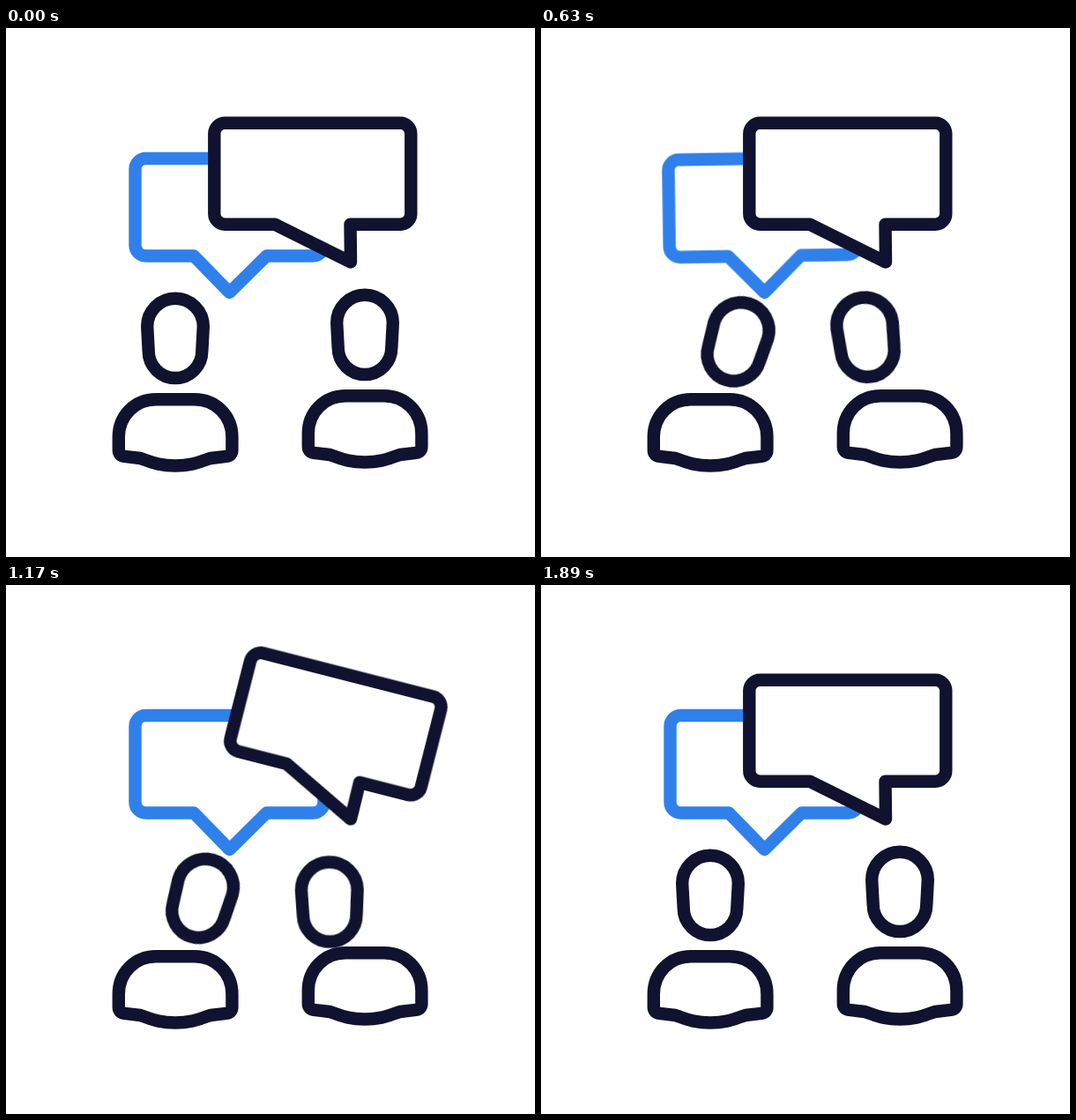
Write an HTML page that moves like this. It is 600x600 px and loops after 1920 ms.

```html
<!DOCTYPE html>
<html lang="en">
<head>
<meta charset="utf-8">
<title>Conversation</title>
<style>
  html, body { margin: 0; width: 100%; height: 100%; overflow: hidden; background: #fff; }
  svg { display: block; width: 100vw; height: 100vh; }

  .ink, .blue { fill: none; stroke-width: 14.4; stroke-linejoin: round; stroke-linecap: round; }
  .ink { stroke: #11122f; }
  .blue { stroke: #3080ec; }
  .front { fill: #fff; }

  .move {
    animation-duration: 1920ms;
    animation-iteration-count: infinite;
    animation-timing-function: cubic-bezier(.37, 0, .63, 1);
  }
  .bubble { animation-name: wobble; }
  .blue { transform-origin: 253.5px 300px; }
  .front { transform-origin: 391px 265.5px; animation-delay: 832ms; }
  .head { transform-origin: 192px 352px; }
  .body { transform-origin: 192px 503.5px; }
  .left.head { animation-name: lean-left; }
  .right.head { animation-name: lean-right; }
  .left.body { animation-name: squash-left; }
  .right.body { animation-name: squash-right; }

  /* swings about the tail tip, dying out after 880 ms */
  @keyframes wobble {
    0% { transform: rotate(0deg); }
    9.17% { transform: rotate(-21.5deg); }
    18.33% { transform: rotate(14.8deg); }
    27.5% { transform: rotate(-9.6deg); }
    36.67% { transform: rotate(4.2deg); }
    45.83%, 100% { transform: rotate(0deg); }
  }

  @keyframes lean-left {
    0% { transform: translate(0, 0) rotate(0deg); }
    14.06% { transform: translate(28px, 1px) rotate(12.8deg); }
    23.44% { transform: translate(32.5px, 5.5px) rotate(18.5deg); }
    42.19% { transform: translate(29.5px, 2.5px) rotate(14.7deg); }
    60.94% { transform: translate(30.5px, 3.5px) rotate(15.8deg); }
    73.44%, 77.1% { transform: translate(28px, 1.5px) rotate(12.8deg); }
    97.9%, 100% { transform: translate(0, 0) rotate(0deg); }
  }

  @keyframes lean-right {
    0% { transform: translate(0, 0) rotate(0deg); }
    14.06% { transform: translate(-36px, 0) rotate(-12.5deg); }
    23.44% { transform: translate(-36.5px, 2.5px) rotate(-12.8deg); }
    42.19% { transform: translate(-40px, 3px) rotate(-1deg); }
    56.25%, 60.94% { transform: translate(-40px, 11.5px) rotate(-1deg); }
    73.44% {
      transform: translate(-36.5px, 3.5px) rotate(-1deg);
      animation-timing-function: cubic-bezier(.25, .1, .4, 1);
    }
    90.6%, 100% { transform: translate(0, 0) rotate(0deg); }
  }

  @keyframes squash-left {
    0%, 18.75%, 78.1%, 96.9%, 100% { transform: scale(1, 1); }
    6.25% { transform: scale(1.05, .94); }
    12.8% { transform: scale(.987, 1.008); }
    84.4% { transform: scale(1.05, .94); }
    91.1% { transform: scale(.985, 1.02); }
  }

  @keyframes squash-right {
    0%, 20.8%, 71.9%, 90.6%, 100% { transform: scale(1, 1); }
    6.25% { transform: scale(1.055, .93); }
    13.3% { transform: scale(.98, 1.022); }
    78.1% { transform: scale(1.05, .94); }
    85.4% { transform: scale(.98, 1.02); }
  }
</style>
</head>
<body>
<svg viewBox="0 0 600 600">
  <defs>
    <path id="head" d="M160.2 338.6a31.8 31.8 0 0 1 63.6 0L222.3 366.5a30.3 30.5 0 0 1-60.6 0Z"/>
    <path id="body" d="M127.8 464C127.8 440 146 421.2 170 421.2H214C238 421.2 256.4 440 256.4 464
      V478.8Q256.4 485 250 485.8L232 488C221 491 213 496.5 192 496.5C171 496.5 163 491 152.2 488
      L134.2 485.8Q127.8 485 127.8 478.8Z"/>
  </defs>

  <path class="blue move bubble" d="M158.5 148H348.5a12 12 0 0 1 12 12V246.5a12 12 0 0 1-12 12
    H295.5L253.5 300L213 258.5H158.5a12 12 0 0 1-12-12V160a12 12 0 0 1 12-12Z"/>
  <path class="ink front move bubble" d="M248.3 107.8H447.3a12 12 0 0 1 12 12V210.7a12 12 0 0 1-12 12
    H390.5L391 265.5L305 222.7H248.3a12 12 0 0 1-12-12V119.8a12 12 0 0 1 12-12Z"/>

  <g class="ink">
    <g class="left body move"><use href="#body"/></g>
    <g class="left head move"><use href="#head"/></g>
  </g>
  <g class="ink" transform="translate(215 -4)">
    <g class="right body move"><use href="#body"/></g>
    <g class="right head move"><use href="#head"/></g>
  </g>
</svg>
</body>
</html>
```
